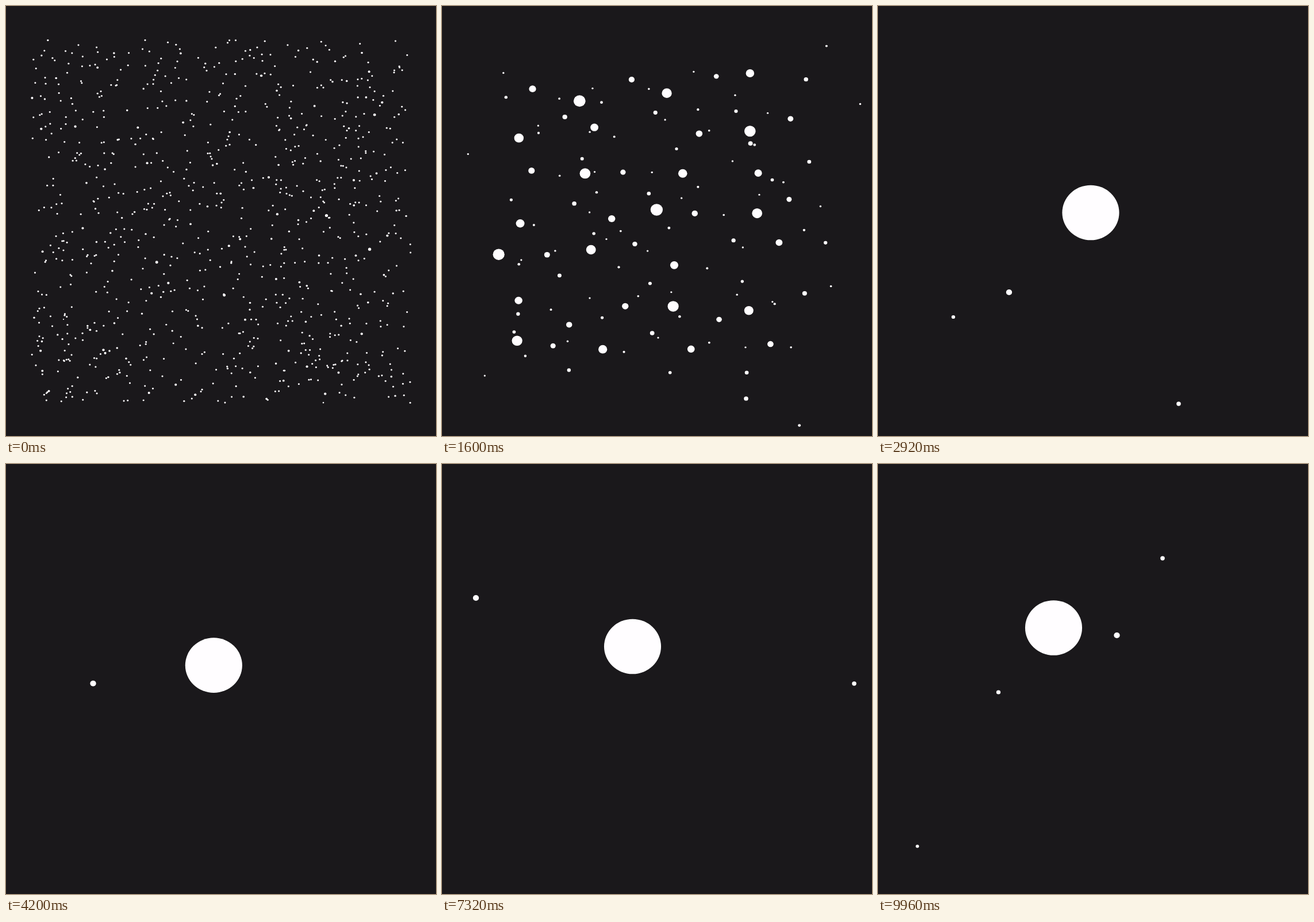
Write an HTML page with a canvas that moves like this. It is 748 px wide and 748 px high and loops after 10 s.

```html
<!DOCTYPE html>
<html lang="en">
<head>
<meta charset="utf-8">
<title>Accretion</title>
<style>
  html, body { margin: 0; width: 100%; height: 100%; overflow: hidden; background: #1a181b; }
  canvas { display: block; }
</style>
</head>
<body>
<canvas id="sky" width="748" height="748"></canvas>
<script>
const LOOP = 10000, STEP = 40;
const CLUMP = 1080, FALL = 1600, DONE = 2860;  // ends of the grain, clump and collapse phases
const HEADS = 126, CLUMPS = 304, GRAINS = 480;
const UNIT = 1.55;                             // radius of one grain
const CX = 372, CY = 362;
const ctx = document.getElementById('sky').getContext('2d');

let seed = 20177;
function rnd() {
  seed = (seed + 0x6D2B79F5) | 0;
  let z = Math.imul(seed ^ (seed >>> 15), 1 | seed);
  z = (z + Math.imul(z ^ (z >>> 7), 61 | z)) ^ z;
  return ((z ^ (z >>> 14)) >>> 0) / 4294967296;
}
const mix = (a, b, k) => a + (b - a) * k;
const clamp = v => Math.max(0, Math.min(1, v));

// Keys are [time, x, y]
const coreKeys = [[0, 375, 342], [2920, 370, 359.5], [5480, 350, 335.5], [7320, 331.5, 317.5], [9960, 305.5, 285]];
const strays = [
  { r: 5.2, keys: [[0, 180, 600], [2920, 228, 498], [5480, 64, 266], [7320, 59, 233], [9400, 285, 205], [9960, 415.5, 298]] },
  { r: 3.8, keys: [[0, 552, 690], [2920, 523, 692], [4700, 590, 790], [5480, 646.5, 670], [7320, 717, 382], [8700, 700, 170], [9960, 495, 164]] },
  { r: 3.2, keys: [[0, 100, 545], [2920, 131, 541], [3900, -10, 610]] },
  { r: 3.7, keys: [[8340, 40, 752], [9960, 209.5, 397]] },
  { r: 2.9, keys: [[9540, 52, 752], [9960, 68.5, 665]] }
];

// Smooth curve through timed keys
function along(keys, t) {
  const last = keys.length - 1;
  let i = 0;
  while (i < last - 1 && t > keys[i + 1][0]) i++;
  const p = keys[i], q = keys[i + 1], h = q[0] - p[0], u = clamp((t - p[0]) / h);
  const slope = (n, c) => {
    const a = keys[Math.max(0, n - 1)], b = keys[Math.min(last, n + 1)];
    return (b[c] - a[c]) / (b[0] - a[0]) * h;
  };
  return [1, 2].map(c => {
    const d = q[c] - p[c], m = slope(i, c), n = slope(i + 1, c);
    return p[c] + u * (m + u * (3 * d - 2 * m - n + u * (m + n - 2 * d)));
  });
}

const bodies = [];

// u and v place a body in the field; drift is how far it sinks before the collapse
function add(u, v, want, drift = .165) {
  const ax = mix(44, 704, u), ay = mix(59, 692, v);
  const base = Math.min(want, rnd() < .05 ? 2.6 : 1);
  const body = {
    ax, ay, want, base, need: want - base, sum: 0, small: [], big: [],
    bx: mix(ax, CX, drift) + (rnd() - .5) * 40,
    by: mix(ay, CY, drift) + (rnd() - .5) * 40
  };
  bodies.push(body);
  return body;
}

function nearest(list, body, score) {
  let best = null, low = Infinity;
  for (const o of list) {
    const s = score(o, Math.hypot(o.ax - body.ax, o.ay - body.ay));
    if (s < low) { low = s; best = o; }
  }
  return best;
}

// Bodies that live until the collapse, heaviest first and evenly spread
function makeHeads() {
  for (let i = 0; i < HEADS; i++) {
    const want = 1 + 46 * Math.exp(-i / 19);
    const outward = i > 30 && i % 8 === 0;
    add((.5 + i * .75488) % 1, (.5 + i * .56984) % 1, want, outward ? -.12 : .165);
  }
  bodies[0].keys = coreKeys;
  bodies.slice(1).forEach((b, i) => {
    b.parent = nearest(bodies.slice(0, i + 1), b, (o, d) => d / Math.sqrt(o.want));
    b.from = FALL;
    b.end = DONE - 1050 * ((i + 1) / HEADS) ** .45;
    b.parent.big.push(b);
  });
  for (const b of bodies.slice().reverse())
    b.full = b.want + b.big.reduce((s, o) => s + o.full, 0);
}

// Bodies swallowed before the collapse: the nearer the host, the sooner
function makeSmall(count, want, from, start, end, ease) {
  const hosts = bodies.slice();
  for (let i = 0; i < count; i++) {
    const b = add(rnd(), rnd(), want());
    const host = nearest(hosts, b, (o, d) => o.need >= b.want ? d ** 3 / o.need : Infinity) || hosts[0];
    const d = Math.hypot(host.ax - b.ax, host.ay - b.ay);
    b.parent = host;
    b.from = from;
    b.end = mix(end, start, Math.exp(-d / ease));
    host.need -= b.want;
    host.sum += b.want;
    host.small.push(b);
  }
}

makeHeads();
makeSmall(CLUMPS, () => 1 + 4 * rnd() ** 4, 500, CLUMP, FALL, 55);
makeSmall(GRAINS, () => 1, 0, 0, CLUMP, 25);

function place(b, t) {
  if (b.keys) {
    [b.x, b.y] = along(b.keys, t);
    return;
  }
  const late = Math.max(0, t - FALL), core = bodies[0];
  const sway = Math.min(1, t / FALL) ** 3 + 900 / FALL * (1 - Math.exp(-late / 300));
  const sink = clamp(late / 1300) ** 1.5;
  const pull = clamp((t - b.from) / (b.end - b.from)) ** 3;
  b.x = mix(mix(mix(b.ax, b.bx, sway), core.x, sink), b.parent.x, pull);
  b.y = mix(mix(mix(b.ay, b.by, sway), core.y, sink), b.parent.y, pull);
}

function mass(b, t) {
  let m = b.want;
  if (b.sum) {
    const got = b.small.reduce((s, o) => s + (o.end <= t ? o.want : 0), 0);
    m = mix(b.base, b.want, got / b.sum);
  }
  for (const o of b.big) if (o.end <= t) m += o.full;
  return m;
}

function dot(x, y, r) {
  ctx.beginPath();
  ctx.ellipse(x, y, r, r * .965, 0, 0, Math.PI * 2);
  ctx.fill();
}

function draw(t) {
  ctx.fillStyle = '#1a181b';
  ctx.fillRect(0, 0, 748, 748);
  ctx.fillStyle = '#fffdff';
  for (const b of bodies) {
    if (t >= b.end) continue;
    place(b, t);
    dot(b.x, b.y, UNIT * Math.sqrt(mass(b, t)));
  }
  for (const { r, keys } of strays) {
    if (t < keys[0][0] || t > keys[keys.length - 1][0]) continue;
    dot(...along(keys, t), r * Math.min(1, .35 + .65 * t / FALL));
  }
}

function tick() {
  const t = performance.now() % LOOP;
  draw(Math.floor(t / STEP) * STEP);
  requestAnimationFrame(tick);
}
tick();
</script>
</body>
</html>
```
